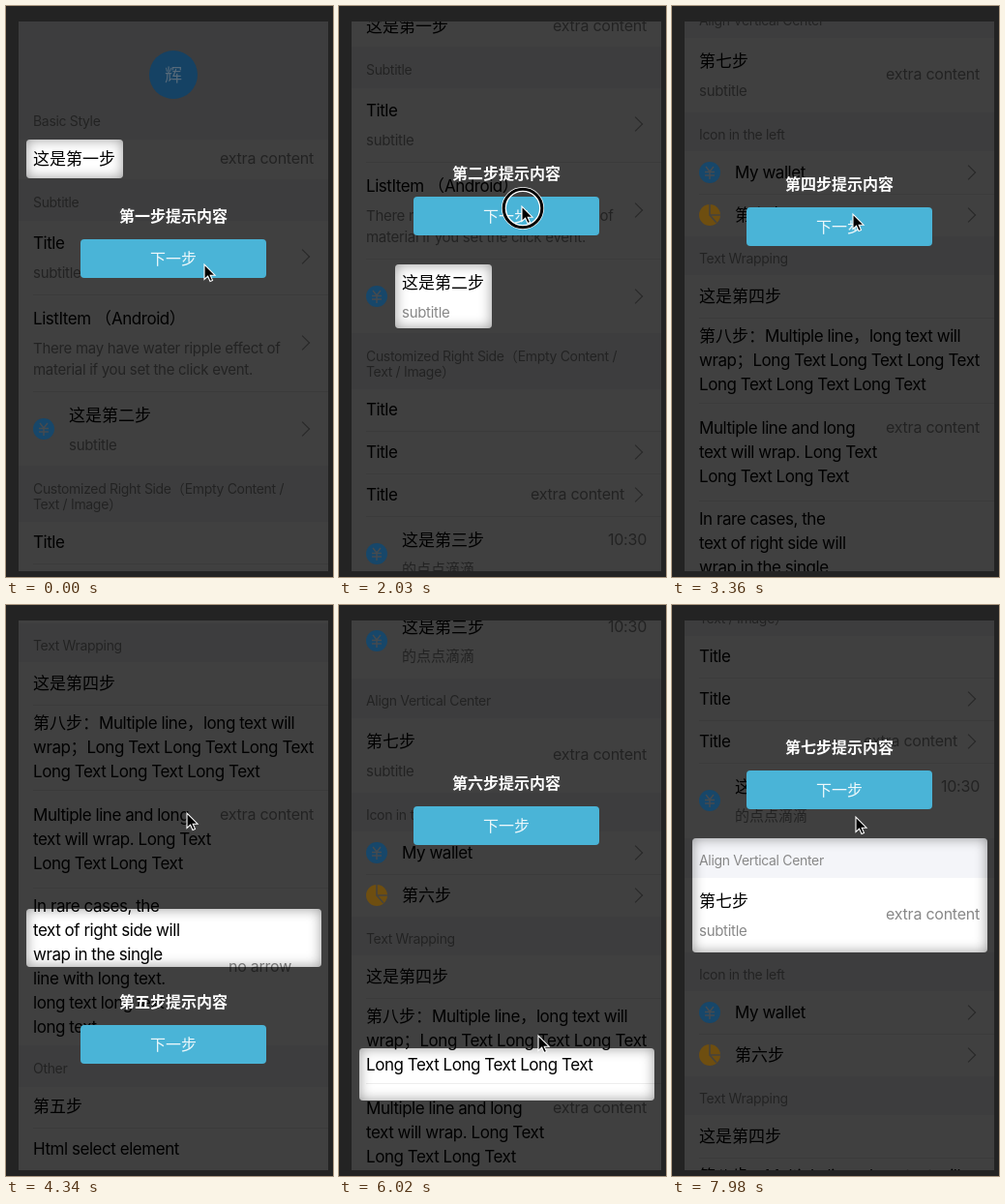
Recreate the animation shown at these times as an HTML page. Size 338 px wide and 590 px high, loop 8 s.

```html
<!DOCTYPE html>
<html lang="zh-CN">
<head>
<meta charset="utf-8">
<style>
html, body { margin: 0; width: 100%; height: 100%; overflow: hidden; background: #232323; }
body { position: relative; font-family: Inter, "Noto Sans CJK SC", "Noto Sans CJK", sans-serif; }
#view { position: absolute; left: 13px; top: 16px; width: 320px; height: 568px; overflow: hidden; background: #f4f5f9; }
/* Children of #stage use window coordinates */
#stage { position: absolute; left: -13px; top: -16px; width: 338px; height: 590px; }
#page, #icons { position: absolute; left: 0; top: 0; width: 338px; height: 1570px; }
#stage div, #icons svg { position: absolute; }
.band { left: 13px; width: 320px; background: #f4f5f9; }
.line { left: 28px; width: 305px; height: 1px; background: #ededed; }
.text { white-space: nowrap; line-height: 1.2; transform: translateY(-50%); }
.text i { font-style: normal; }
.chevron { left: 301px; width: 10px; height: 10px; border: solid #999; border-width: 1.5px 1.5px 0 0; transform: translateY(-50%) rotate(45deg); }
#page { background: #fff; }
#hole { border-radius: 4px; box-shadow: 0 0 0 2500px rgba(0,0,0,.75), inset 0 0 13px rgba(0,0,0,.4); }
#tip { left: 77px; width: 192px; height: 40px; border-radius: 4px; background: #4ab4d7; color: #eef8fb;
  font-size: 16px; font-weight: 300; line-height: 40px; text-align: center; }
#label { left: 0; width: 192px; top: -34px; line-height: 20px; font-weight: 600; color: #fff; }
#blank { left: 13px; top: 16px; width: 320px; height: 568px; background: #f4f5f9; }
#pointer { position: absolute; left: 0; top: 0; overflow: visible; }
</style>
</head>
<body>
<div id="view"><div id="stage">
  <div id="page"></div>
  <div id="hole"></div>
  <div id="icons"></div>
  <div id="tip"><div id="label"></div>下一步</div>
  <div id="blank"></div>
</div></div>
<svg id="pointer" width="30" height="30">
  <g id="ring" fill="none"><circle cx="1" cy="2" r="19.5" stroke="#fff" stroke-width="5"/><circle cx="1" cy="2" r="19.8" stroke="#000" stroke-width="3"/></g>
  <path d="M0 0V15.5L3.6 12.2L6 17.5L8.5 16.4L6.2 11.2H11Z" stroke="#fff" stroke-width="1.1"/>
</svg>
<script>
const $ = id => document.getElementById(id);
const page = $('page');

function add(cls, style, html = '') {
  const el = document.createElement('div');
  el.className = cls;
  el.style.cssText = style;
  el.innerHTML = html;
  page.append(el);
}
// Latin runs are tracked tighter than the Chinese ones
const tracking = { 14: -.023, 15: -.019, 16: -.015, 17: -.027 };
function text(str, y, { x = 28, right, size = 17, color = '#000' } = {}) {
  const html = str.replace(/[\x20-\x7e]+/g, run => `<i style="letter-spacing:${tracking[size]}em">${run}</i>`);
  const side = right ? `right:${338 - right}px` : `left:${x}px`;
  add('text', `${side};top:${y}px;font-size:${size}px;color:${color}`, html);
}
const band = (top, bottom) => add('band', `top:${top}px;height:${bottom - top}px`);
const heading = (str, y) => text(str, y, { size: 14, color: '#888' });
const sub = (str, y, x = 28) => text(str, y, { x, size: 15, color: '#888' });
const extra = (str, y, right = 318) => text(str, y, { right, size: 16, color: '#888' });
const lines = (y, ...rows) => rows.forEach((row, i) => text(row, y + i * 25));

[[0, 138], [179, 222], [475, 533], [742, 783], [860, 900], [988, 1028], [1424, 1467]].forEach(b => band(...b));
[298, 398, 576, 620, 664, 944, 1072, 1160, 1261, 1509].forEach(y => add('line', `top:${y}px`));
[259, 348, 437, 598, 642, 922, 966].forEach(y => add('chevron', `top:${y}px`));

heading('Basic Style', 119);
text('这是第一步', 158);
extra('extra content', 158);
heading('Subtitle', 203);
text('Title', 245);
sub('subtitle', 276);
text('ListItem （Android）', 323);
sub('There may have water ripple effect of', 354);
sub('material if you set the click event.', 376);
text('这是第二步', 423, { x: 65 });
sub('subtitle', 454, 65);
heading('Customized Right Side（Empty Content /', 499);
heading('Text / Image）', 515);
[554, 598, 642].forEach(y => text('Title', y));
extra('extra content', 642, 295);
text('这是第三步', 689, { x: 65 });
sub('的点点滴滴', 719, 65);
extra('10:30', 689);
heading('Align Vertical Center', 765);
text('第七步', 807);
sub('subtitle', 838);
extra('extra content', 821);
heading('Icon in the left', 883);
text('My wallet', 922, { x: 65 });
text('第六步', 966, { x: 65 });
heading('Text Wrapping', 1011);
text('这是第四步', 1050);
lines(1091, '第八步：Multiple line，long text will', 'wrap；Long Text Long Text Long Text', 'Long Text Long Text Long Text');
lines(1186, 'Multiple line and long', 'text will wrap. Long Text', 'Long Text Long Text');
extra('extra content', 1186);
lines(1280, 'In rare cases, the', 'text of right side will', 'wrap in the single', 'line with long text.', 'long text long text', 'long text');
extra('no arrow', 1343, 295);
heading('Other', 1448);
text('第五步', 1487);
text('Html select element', 1531);

const svg = (y, body, x = 39, r = 11) =>
  `<svg style="left:${x - r}px;top:${y - r}px" width="${2 * r}" height="${2 * r}" viewBox="${-r} ${-r} ${2 * r} ${2 * r}">${body}</svg>`;
const yen = '<circle r="11" fill="#17476a"/><path d="M-4-6L0-1L4-6M0-1V7M-5-.5H5M-5 3H5" fill="none" stroke="#454b50" stroke-width="1.5"/>';
const pie = '<circle r="11" fill="#6e4e10"/><path d="M0-11V0H11M0 0L7 8" fill="none" stroke="#45433e" stroke-width="1.6"/>';
$('icons').innerHTML =
  svg(71, '<circle r="25" fill="#154264"/><text y="6.5" font-size="18" text-anchor="middle" fill="#566a7a">辉</text>', 173, 25) +
  [437, 703, 922].map(y => svg(y, yen)).join('') + svg(966, pie);

// hole: left, top, width, height in page coordinates
const steps = [
  { at: -1000, scroll: 0, hole: [21, 138, 100, 40], name: '一' },
  { at: 1050, scroll: 137, hole: [58, 404, 100, 66], name: '二', blank: 70 },
  { at: 2170, scroll: 403, hole: [58, 670, 100, 66], name: '三', blank: 70 },
  { at: 3350, scroll: 750, hole: [21, 1028, 305, 44], name: '四' },
  { at: 4223, scroll: 969, hole: [21, 1473, 305, 73], name: '五' },
  { at: 5880, scroll: 666, hole: [21, 944, 305, 44], name: '六', blank: 70 },
  { at: 6900, scroll: 501, hole: [21, 742, 305, 118], name: '七', blank: 90 }
];
const clicks = [840, 1960, 3150, 3990, 5670, 6650];
// start, end, x, y
const moves = [
  [0, 0, 205, 267], [1200, 1600, 189, 207], [2520, 2940, 187, 215],
  [4830, 5400, 206, 445], [6020, 6440, 190, 219]
];
const clamp = v => Math.min(1, Math.max(0, v));
const mix = (a, b, p) => a + (b - a) * p;

function render(t) {
  const n = steps.findLastIndex(s => s.at <= t);
  const step = steps[n], from = steps[Math.max(0, n - 1)];
  const p = 1 - (1 - clamp((t - step.at) / 300)) ** 1.7;
  const [x, y, w, h] = step.hole.map((v, i) => mix(from.hole[i], v, p));
  const hole = $('hole').style;
  hole.left = x + 'px';
  hole.top = y - step.scroll + 'px';
  hole.width = w + 'px';
  hole.height = h + 'px';
  page.style.top = $('icons').style.top = -step.scroll + 'px';
  $('tip').style.top = (n ? step.hole[1] - step.scroll - 70 : 241) + 'px';
  $('label').textContent = `第${step.name}步提示内容`;
  $('blank').style.display = t - step.at < (step.blank || 0) ? 'block' : 'none';

  let [, , cx, cy] = moves[0];
  for (const [start, end, mx, my] of moves.slice(1)) {
    const q = clamp((t - start) / (end - start));
    const eased = q * q * (3 - 2 * q);
    cx = mix(cx, mx, eased);
    cy = mix(cy, my, eased);
  }
  $('pointer').style.transform = `translate(${cx}px, ${cy}px)`;
  $('ring').style.display = clicks.some(c => t >= c && t < c + 140) ? 'inline' : 'none';
}

const begin = performance.now();
function tick() {
  render((performance.now() - begin) % 8000);
  requestAnimationFrame(tick);
}
tick();
</script>
</body>
</html>
```
